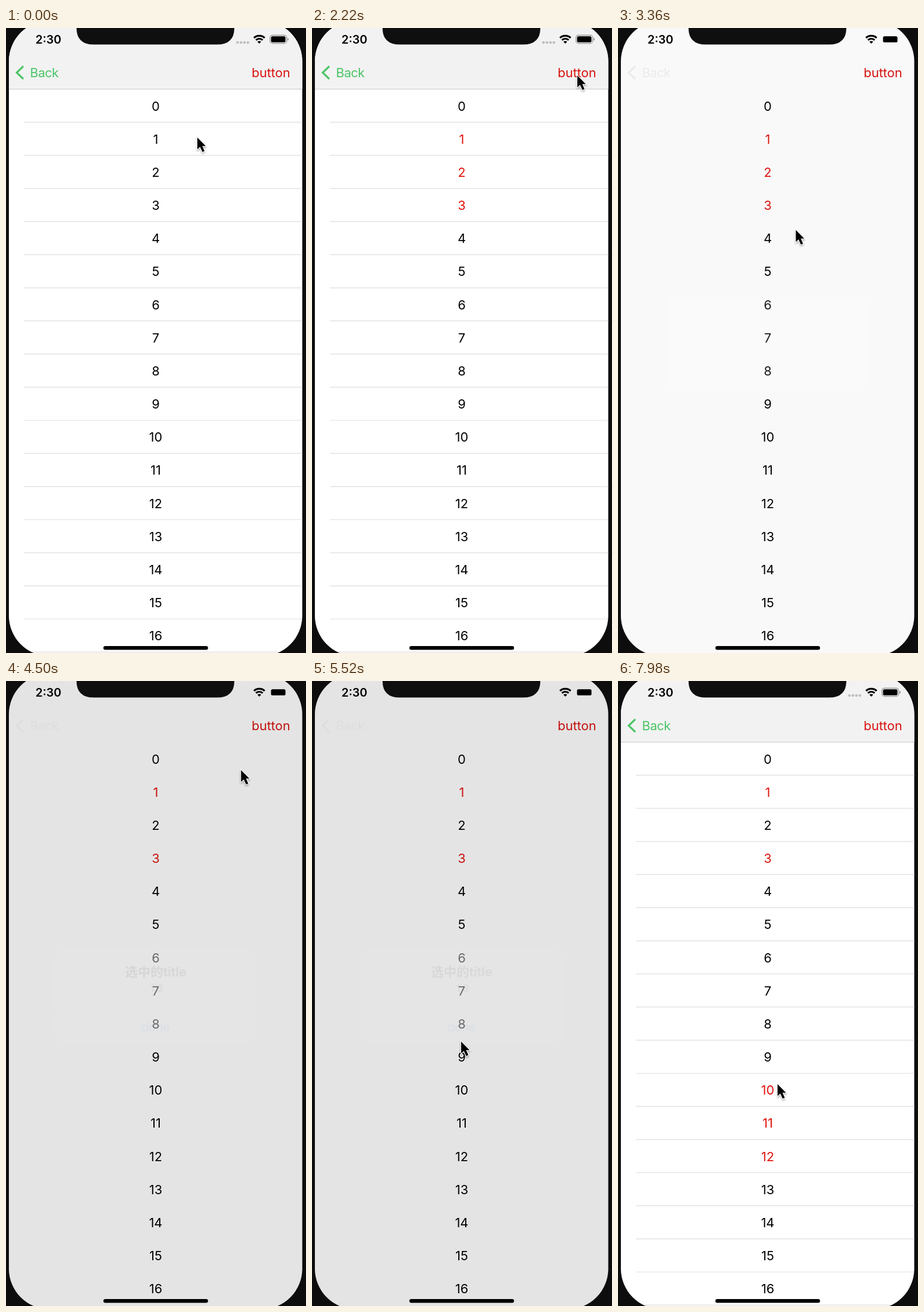
Animation, 519 px wide and 1079 px high, one loop 8000 ms. Source, as an HTML page:

```html
<!DOCTYPE html>
<html lang="en">
<head>
<meta charset="utf-8">
<title>List selection</title>
<style>
  html, body { margin: 0; width: 100%; height: 100%; overflow: hidden; background: #0d0d0d; }
  svg { display: block; width: 100%; height: 100%; }
  text { font: 22px Inter, "Noto Sans CJK SC", "Noto Sans CJK", sans-serif; }
  .mid { text-anchor: middle; }
</style>
</head>
<body>
<svg viewBox="0 0 519 1079">
  <defs>
    <clipPath id="screen"><rect x="5" y="-12.5" width="507.5" height="1097" rx="70"/></clipPath>
    <filter id="shadow" x="-50%" y="-50%" width="200%" height="200%">
      <feDropShadow dx="0" dy="2" stdDeviation="1.5" flood-opacity=".35"/>
    </filter>
  </defs>
  <g clip-path="url(#screen)">
    <rect width="519" height="1079" fill="#fff"/>
    <g id="lines">
      <rect width="519" height="105" fill="#f2f2f2"/>
      <path d="M5 105.5H513" stroke="#c9c9c9"/>
      <path d="M400.5 25h19" stroke="#bdbdbd" stroke-width="4.6" stroke-linecap="round" stroke-dasharray="0 6"/>
      <rect x="456.6" y="12.3" width="29" height="14.4" rx="4.3" fill="none" stroke="#909090" stroke-width="1.2"/>
      <path d="M487 17q2 .6 2 2.5t-2 2.5z" fill="#909090"/>
    </g>
    <text x="51" y="27" style="font-size:20px;font-weight:600">2:30</text>
    <g fill="none" stroke="#000" stroke-width="3.2">
      <path d="M429 17.2a13.2 13.2 0 0 1 18.4 0M432.4 20.8a8.4 8.4 0 0 1 11.6 0"/>
      <path d="M438.2 27l-3.2-3.3a4.6 4.6 0 0 1 6.4 0z" fill="#000" stroke="none"/>
    </g>
    <rect x="458.5" y="14.2" width="25" height="10.6" rx="2.6"/>
    <g id="back">
      <path d="M30 66L18.5 77L30 88" fill="none" stroke="currentColor" stroke-width="3.2"/>
      <text x="41.5" y="85" fill="currentColor" letter-spacing="-.5">Back</text>
    </g>
    <text x="491.8" y="85" text-anchor="end" fill="#d8120e">button</text>
    <g id="rows"></g>
    <rect x="168.5" y="1067" width="181" height="6.5" rx="3.2"/>
    <rect id="dim" width="519" height="1079"/>
    <g id="alert">
      <rect id="panel" x="83" y="463" width="351.5" height="162" rx="17"/>
      <g id="words">
        <path d="M83 567.5H434.5" stroke="#c6c6c6"/>
        <text class="mid" x="259" y="510" fill="#1c1c1c" style="font-weight:600">选中的title</text>
        <text class="mid" id="message" x="260.5" y="537" fill="#222" style="font-size:17px"></text>
        <text class="mid" x="258.5" y="605" fill="#2c87e8" letter-spacing="-.8">done</text>
      </g>
    </g>
  </g>
  <path d="M122 0Q122 28.6 152 28.6H365Q395 28.6 395 0z" fill="#0f0f0f"/>
  <path id="cursor" d="M0 0V20.5l4.7-4.2 4.1 8.8 3.7-1.7-3.9-8.6h6z" stroke="#fff" stroke-width="2"
        paint-order="stroke" filter="url(#shadow)"/>
</svg>
<script>
const LOOP = 8000, STEP = 60, TOP = 135, PITCH = 57.17;
const REST = 90, TRAVEL = 320, FADE_IN = 300, FADE_OUT = 350;
const $ = id => document.getElementById(id);

// Pointer stops; all but the hovers are taps, and taps drive everything else.
const stop = (time, x, y, hover = false) => ({ time, x, y, hover });
const onButton = time => stop(time, 459, 82);
const onDone = time => stop(time, 258, 606);
const stops = [
  stop(240, 331, 189), stop(900, 310, 245), stop(1440, 306, 300),
  onButton(2220), onDone(3045), stop(3660, 321, 240),
  onButton(4303), onDone(5312),
  stop(5700, 258, 700), stop(6000, 258, 756), stop(6540, 257, 812),
  stop(7080, 500, 16, true), stop(7500, 458, 84, true), stop(LOOP, 276, 696)
];

const alerts = [], taps = [];
let open = null;
for (const { time, y, hover } of stops) {
  if (hover) continue;
  if (open) {
    open.hide = time + 40;
    open = null;
  } else if (y < 106) {
    alerts.push(open = { show: time + 40 });
  } else {
    taps.push({ time, row: Math.round((y - TOP) / PITCH) });
  }
}

const clamp = v => Math.min(1, Math.max(0, v));
const smooth = v => (v = clamp(v), v * v * (3 - 2 * v));

function add(parent, name, attrs) {
  const el = document.createElementNS("http://www.w3.org/2000/svg", name);
  set(el, attrs);
  return parent.appendChild(el);
}

function set(el, attrs) {
  for (const key in attrs) el.setAttribute(key, attrs[key]);
}

const labels = Array.from({ length: 17 }, (_, i) => {
  const y = TOP + i * PITCH;
  add($("lines"), "path", { d: `M31 ${y + 27.7}H513`, stroke: "#dedede", "stroke-width": 1.2 });
  const label = add($("rows"), "text", { class: "mid", x: 259, y: y + 7.5 });
  label.textContent = i;
  return label;
});

// Rest briefly after each stop, then sweep to the next; y lags behind x.
function pointer(t) {
  const i = stops.findIndex(s => s.time > t);
  const to = stops[i], from = stops[i - 1] || to;
  const k = smooth((t - from.time - REST) / TRAVEL);
  return [from.x + (to.x - from.x) * k, from.y + (to.y - from.y) * k ** 1.48];
}

function draw(t) {
  const isOn = i => taps.filter(tap => tap.row === i && tap.time <= t).length % 2 === 1;
  const chosen = labels.map((_, i) => i).filter(isOn);
  labels.forEach((label, i) => set(label, { fill: chosen.includes(i) ? "#e0140e" : "#000" }));

  const shown = Math.max(...alerts.map(a =>
    smooth((t - a.show) / FADE_IN) * (1 - smooth((t - a.hide) / FADE_OUT))));
  const flat = shown > 0 && shown < 0.8;    // bars and rules vanish mid-fade
  const grey = flat ? 255 * (1 - 0.2 * shown) : 234;

  set($("dim"), { opacity: 0.2 * shown });
  set($("lines"), { opacity: flat ? 0 : 1 });
  set($("back"), { opacity: flat ? 0.25 * (1 - shown) : 1, color: shown ? "#c0c0c0" : "#4bc566" });
  set($("panel"), { opacity: shown < 1 ? 0.86 * shown : 1, fill: `rgb(${grey},${grey},${grey})` });
  set($("words"), { opacity: clamp(2 * shown - 1) });
  $("message").textContent = chosen.join(" ");
  set($("cursor"), { transform: `translate(${pointer(t)})` });
}

function tick(now) {
  draw(Math.floor(now % LOOP / STEP) * STEP);
  requestAnimationFrame(tick);
}
tick(performance.now());
</script>
</body>
</html>
```
